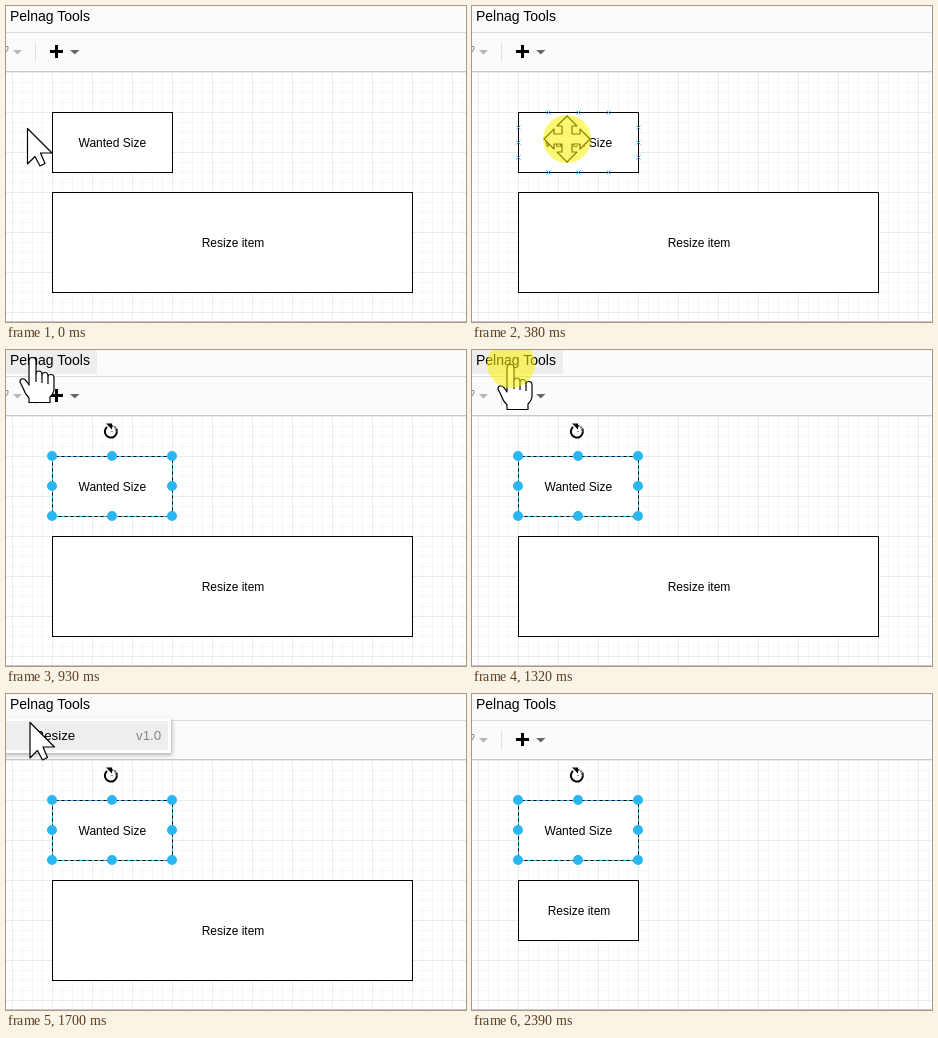
These frames come from a looping animation (460 px wide and 316 px high, 3160 ms). An HTML page:

```html
<!DOCTYPE html>
<html lang="en">
<head>
<meta charset="utf-8">
<title>Resize demo</title>
<style>
  html, body { margin: 0; height: 100%; overflow: hidden; background: #fff; }
  svg { display: block; width: 100vw; height: 100vh; }
  text { font: 12px "Liberation Sans", Arial, sans-serif; }
  .label { text-anchor: middle; }
  .title { font-size: 14px; }
  .item { font-size: 13.33px; }
  .box { fill: #fff; stroke: #000; }
  .cursor { fill: #fff; stroke: #000; stroke-width: 1.2; stroke-linejoin: round; }
</style>
</head>
<body>
<svg viewBox="0 0 460 316">
  <defs>
    <pattern id="grid" x="6" y="66" width="40" height="40" patternUnits="userSpaceOnUse">
      <path d="M10.5 0V40M20.5 0V40M30.5 0V40M0 10.5H40M0 20.5H40M0 30.5H40" stroke="#f6f6f6"/>
      <path d="M.5 0V40M0 .5H40" stroke="#ebebeb"/>
    </pattern>
    <clipPath id="canvasArea"><path d="M0 66H460V316H0Z"/></clipPath>
    <filter id="shadow" x="-10%" y="-30%" width="120%" height="180%">
      <feDropShadow dx="1" dy="2" stdDeviation="2" flood-opacity=".3"/>
    </filter>
    <path id="hint" d="M-3 27H3V13H9L0 2L-9 13H-3Z"/>
  </defs>

  <rect y="66" width="460" height="250" fill="url(#grid)"/>
  <path d="M0 315.5H460" stroke="#c8c8c8"/>
  <rect class="box" x="46.5" y="106.5" width="120" height="60"/>
  <text class="label" x="106.3" y="141">Wanted Size</text>
  <rect class="box" id="target" x="46.5" y="186.5" width="360" height="100"/>
  <text class="label" id="targetLabel">Resize item</text>

  <path id="ports" fill="none" stroke="#29b6f2"/>
  <g id="selection">
    <rect x="46.5" y="106.5" width="120" height="60" fill="none" stroke="#29b6f2" stroke-dasharray="3"/>
    <path id="handles" stroke="#29b6f2" stroke-width="10" stroke-linecap="round"/>
    <g fill="none" stroke="#000" stroke-width="2">
      <path d="M101 77A6 6 0 1 0 110 78.5"/>
      <path d="M106 76A5.5 5.5 0 0 1 111 82" stroke="#555" stroke-dasharray="1.5 1"/>
      <path d="M100 73.5H106V79.5Z" fill="#000" stroke="none"/>
      <path d="M105 81.5H107" stroke="#999" stroke-width="1"/>
    </g>
  </g>
  <g id="hints" fill="#29b6f2" opacity=".3" clip-path="url(#canvasArea)">
    <use href="#hint" transform="translate(7 136.5) rotate(-90)"/>
    <use href="#hint" transform="translate(205 136.5) rotate(90)"/>
    <use href="#hint" transform="translate(106.5 47)"/>
  </g>

  <rect width="460" height="66" fill="#fbfbfb"/>
  <path d="M0 26.5H460" stroke="#dcdcdc"/>
  <path d="M0 65.5H460" stroke="#c8c8c8"/>
  <rect id="menuHot" width="91" height="24" fill="#eee"/>
  <text class="title" x="4" y="15">Pelnag Tools</text>
  <path d="M0 40.5H2V43L0 46" fill="none" stroke="#888"/>
  <path d="M7 44H16L11.5 48.5Z" fill="#b5b5b5"/>
  <path d="M29.5 36V56" stroke="#e0e0e0"/>
  <path d="M44 45.5H57M50.5 39V52" stroke="#000" stroke-width="3"/>
  <path d="M64 44H73.5L68.75 48.5Z" fill="#666"/>

  <g id="popup">
    <rect x="-10" y="24" width="175" height="35" fill="#fff" filter="url(#shadow)"/>
    <rect y="27" width="162" height="29" fill="#eee"/>
    <text class="item" x="28.5" y="46">Resize</text>
    <text class="item" x="130" y="46" fill="#888">v1.0</text>
  </g>

  <g id="pointer">
    <path class="cursor" id="arrow" d="M.5 .5V36L8 28.5L13 38L18 35.5L13.5 25H25Z"/>
    <path class="cursor" id="move" d="M0-23L10-13H5V-5H13V-10L23 0L13 10V5H5V13H10L0 23L-10 13H-5V5H-13V10L-23 0L-13-10V-5H-5V-13H-10Z"/>
    <g class="cursor" id="hand">
      <path d="M-4 28V4Q-4 .5-.5 .5T3 4V17Q3 14 6 14T9 18Q9 15.5 12 15.5T15 19.5Q15 17.5 18 17.5T21 21V32Q21 36 17 40V45.5H-4V41Q-8 37-10 31L-13 25Q-13 21-9 22Q-7 23-4 28Z"/>
      <path d="M3 17V25M9 18V26M15 19.5V27" fill="none"/>
    </g>
    <circle id="glow" r="24" fill="#faf200"/>
  </g>
</svg>
<script>
const LOOP = 3160;
const el = id => document.getElementById(id);

// [start ms, cursor, x, y, click glow]
const steps = [
  [0, 'arrow', 21, 122, 0],
  [80, 'move', 58, 128, 0],
  [150, 'move', 95, 133, 0],
  [380, 'move', 95, 133, 1],
  [550, 'move', 95, 133, .5],
  [620, 'move', 95, 133, 0],
  [700, '', 0, 0, 0],
  [930, 'hand', 27, 7, 0],
  [1010, 'hand', 33, 10, 0],
  [1090, 'hand', 39, 14, 0],
  [1320, 'hand', 39, 14, 1],
  [1470, 'hand', 39, 14, .5],
  [1550, 'hand', 39, 14, 0],
  [1620, 'hand', 31, 22, 0],
  [1700, 'arrow', 23.5, 28, 0],
  [1930, 'hand', 23, 33, 0],
  [2010, 'hand', 23, 37, 0],
  [2090, 'hand', 23, 37, 1],
  [2240, 'hand', 23, 37, .5],
  [2310, 'hand', 23, 37, 0],
  [2390, '', 0, 0, 0],
];

// When each interface part is visible
const spans = {
  ports: [80, 470],
  selection: [470, LOOP],
  hints: [470, 700],
  menuHot: [930, 1390],
  popup: [1390, 2240],
};
const RESIZED = 2310;

const show = (id, on) => el(id).setAttribute('display', on ? 'inline' : 'none');

const cross = (x, y) => `M${x - 2} ${y - 2}l4 4m0-4l-4 4`;
const dot = (x, y) => `M${x} ${y}h.01`;
let ports = '', handles = '';
for (const f of [.25, .5, .75]) {
  const x = 46.5 + 120 * f, y = 106.5 + 60 * f;
  ports += cross(x, 106.5) + cross(x, 166.5) + cross(46.5, y) + cross(166.5, y);
}
for (const x of [46, 106, 166])
  for (const y of [106, 136, 166])
    if (x !== 106 || y !== 136) handles += dot(x, y);
el('ports').setAttribute('d', ports);
el('handles').setAttribute('d', handles);

function draw(t) {
  const [, cursor, x, y, glow] = steps.findLast(step => step[0] <= t);
  for (const id of ['arrow', 'move', 'hand']) show(id, id === cursor);
  el('pointer').setAttribute('transform', `translate(${x} ${y})`);
  el('glow').setAttribute('opacity', glow * .55);

  for (const [id, [from, to]] of Object.entries(spans)) show(id, t >= from && t < to);

  const [w, h] = t < RESIZED ? [360, 100] : [120, 60];
  el('target').setAttribute('width', w);
  el('target').setAttribute('height', h);
  el('targetLabel').setAttribute('x', 47 + w / 2);
  el('targetLabel').setAttribute('y', 191 + h / 2);
}

function tick() {
  draw(performance.now() % LOOP);
  requestAnimationFrame(tick);
}
tick();
</script>
</body>
</html>
```
